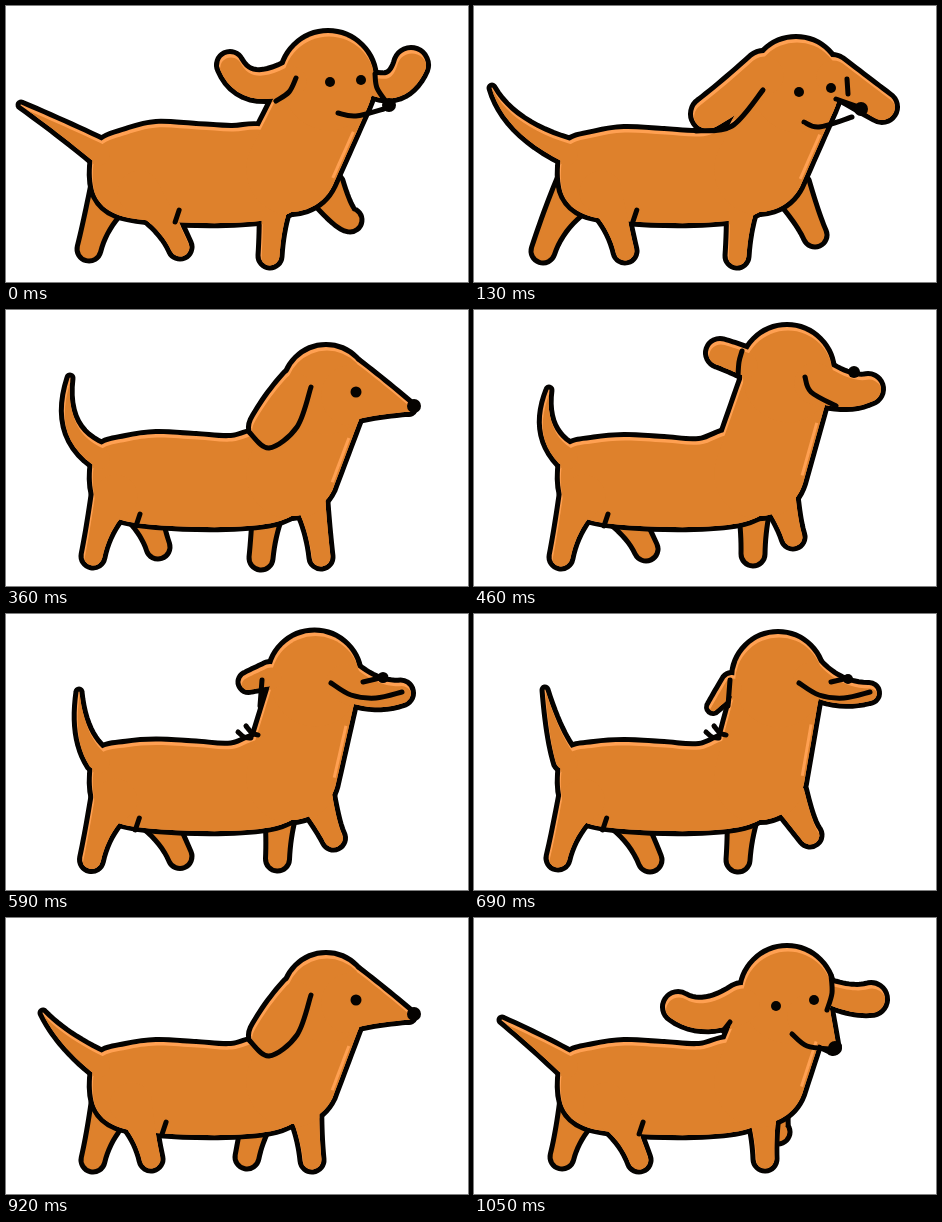
Write an HTML page that moves like this. It is 462 by 276 pixels and loops after 1.15 s.

```html
<!DOCTYPE html>
<html lang="en">
<head>
<meta charset="utf-8">
<title>Walking dachshund</title>
<style>
  html, body { margin: 0; width: 100%; height: 100%; overflow: hidden; background: #fff; }
  svg { display: block; width: 100%; height: 100%; }
  .fur { fill: #de812c; }
  .light { fill: #ffa052; }
  .dot { fill: #050301; }
  .ink, .line { stroke: #050301; stroke-linejoin: round; stroke-linecap: round; }
  .ink { stroke-width: 10; }
  .line { fill: none; stroke-width: 5; }
  .glow { fill: none; stroke: #ffa052; stroke-width: 3; }
</style>
</head>
<body>
<svg id="stage" viewBox="0 0 462 276"></svg>
<script>
// dome: x, y, radius. limbs (ears, snout): start, bend, end, two radii.
const profile = {
  dome: [320, 79, 42],
  limbs: [[290, 75, 274, 96, 264, 118, 16, 20], [345, 82, 372, 88, 403, 98, 32, 5]],
  dots: [[350, 82, 5.5], [408, 96, 7]],
  lines: [[243, 122, 263, 138, 291, 117, 305, 77]]
};

const lookBack = {
  dome: [313, 63, 46],
  limbs: [[270, 52, 258, 47, 246, 43, 14, 13], [340, 70, 372, 86, 394, 79, 22, 14]],
  dots: [[380, 62, 6]],
  lines: [[331, 67, 337, 82, 362, 96], [268, 41, 265, 52, 264, 66]]
};

const lookAway = {
  dome: [304, 65, 45],
  limbs: [[258, 70, 248, 82, 239, 93, 10, 5], [335, 62, 362, 83, 395, 79, 18, 9]],
  dots: [[374, 65, 5]],
  lines: [[325, 69, 345, 81, 370, 84, 396, 78], [357, 68, 374, 64], [256, 66, 254, 92],
    [232, 118, 238, 123, 245, 124], [240, 112, 246, 119, 252, 121]]
};

const earsUp = {
  dome: [322, 74, 47],
  limbs: [[285, 72, 240, 92, 224, 59, 16, 12], [372, 80, 395, 85, 405, 59, 12, 16]],
  dots: [[324, 76, 5], [355, 74, 5], [383, 99, 7]],
  lines: [[270, 95, 283, 86, 290, 72], [332, 107, 350, 110, 381, 102], [369, 68, 371, 82, 381, 97]]
};

const earsDown = {
  dome: [322, 78, 45],
  limbs: [[290, 66, 258, 92, 234, 108, 20, 16], [358, 68, 385, 86, 408, 101, 18, 14]],
  dots: [[325, 86, 5], [357, 82, 5], [387, 103, 7]],
  lines: [[222, 125, 258, 120, 289, 84], [330, 116, 345, 121, 378, 111], [373, 73, 374, 88], [362, 93, 382, 100]]
};

const earsOut = {
  dome: [313, 76, 46],
  limbs: [[268, 84, 230, 106, 204, 89, 18, 14], [358, 76, 380, 84, 397, 81, 12, 15], [335, 95, 348, 115, 359, 129, 24, 5]],
  dots: [[302, 88, 5], [340, 82, 5], [361, 130, 7]],
  lines: [[249, 113, 256, 104], [318, 116, 333, 128, 357, 131], [357, 57, 358, 75, 353, 92]]
};

// rear, front: near paw then far paw. tail: tip and sideways bend. sag: drop of the back.
const keys = [
  { head: earsUp,   rear: [174, 241, 83, 243], front: [264, 250, 344, 214], tail: [15, 99, 56],  sag: -6 },
  { head: earsDown, rear: [151, 245, 69, 245], front: [263, 250, 341, 229], tail: [18, 82, 35],  sag: -1 },
  { head: profile,  rear: [87, 246, 152, 237], front: [315, 247, 255, 248], tail: [64, 68, 52],  sag: 0 },
  { head: lookBack, rear: [87, 247, 172, 239], front: [319, 227, 279, 244], tail: [75, 80, 64],  sag: 3 },
  { head: lookAway, rear: [84, 244, 176, 246], front: [336, 221, 264, 246], tail: [71, 76, 80],  sag: 4 },
  { head: profile,  rear: [145, 241, 87, 242], front: [306, 242, 241, 239], tail: [37, 95, 56],  sag: 0 },
  { head: earsOut,  rear: [165, 242, 88, 239], front: [291, 241, 304, 214], tail: [28, 102, 60], sag: 0 }
];

// Halfway between two poses; parts that do not correspond come from the second.
function halfway(a, b) {
  if (typeof b === 'number') return (a + b) / 2;
  if (Array.isArray(b)) return a.length === b.length ? b.map((v, i) => halfway(a[i], v)) : b;
  return Object.fromEntries(Object.keys(b).map(key => [key, halfway(a[key], b[key])]));
}

const between = i => halfway(keys[i], keys[i + 1]);
const poses = [keys[0], keys[1], between(1), keys[2], keys[3], between(3), keys[4], between(4), keys[5], keys[6]];

const mix = (a, b, t) => a + (b - a) * t;
const pairs = flat => flat.flatMap((x, i) => i % 2 ? [] : [[x, flat[i + 1]]]);

// Catmull-Rom spline through a flat list of points
function curve(flat, closed) {
  const points = pairs(flat), n = points.length;
  const at = i => points[closed ? (i + n) % n : Math.max(0, Math.min(n - 1, i))];
  let d = 'M' + points[0];
  for (let i = 0; i < (closed ? n : n - 1); i++) {
    const [p, a, b, q] = [at(i - 1), at(i), at(i + 1), at(i + 2)];
    d += `C${a.map((v, k) => v + (b[k] - p[k]) / 6)} ${b.map((v, k) => v - (q[k] - a[k]) / 6)} ${b}`;
  }
  return d;
}

// One side of a tapered limb; side is -1 for left, 1 for right.
function edge([x0, y0, bx, by, x1, y1, r0, r1], side, flare = 1, inset = 1) {
  return Array.from({ length: 13 }, (_, i) => {
    const t = i / 12, r = mix(r1, r0, (1 - t) ** flare) - inset;
    const dx = mix(bx - x0, x1 - bx, t), dy = mix(by - y0, y1 - by, t), len = Math.hypot(dx, dy);
    return [
      mix(mix(x0, bx, t), mix(bx, x1, t), t) - side * r * dy / len,
      mix(mix(y0, by, t), mix(by, y1, t), t) + side * r * dx / len
    ];
  });
}

function limb(spec, flare) {
  const left = edge(spec, -1, flare), right = edge(spec, 1, flare).reverse();
  const cap = (r, point) => `A${r - 1} ${r - 1} 0 0 1 ${point}`;
  return 'M' + left.join('L') + cap(spec[7], right[0]) + 'L' + right.join('L') + cap(spec[6], left[0]) + 'Z';
}

// A leg swings from a hip that follows its paw a little.
function leg(x, y, hip, follow, thigh) {
  const top = hip + (x - hip) * follow;
  return limb([top, 183, mix(top, x, 0.7), 213, x, y, thigh, 10.5], 2);
}
const rearLeg = (x, y) => leg(x, y, 117, 0.27, 23);
const frontLeg = (x, y) => leg(x, y, 283, 0.6, 18);

const torso = sag => curve([
  94, 136, 120, 128 + sag / 2, 150, 124 + sag, 190, 126 + sag, 225, 128 + sag, 262, 122,
  320, 150, 325, 178, 300, 197, 270, 212, 220, 217, 150, 215, 110, 208, 90, 190, 86, 160
], true);

const circle = (x, y, r) => limb([x, y - 1, x, y, x, y + 1, r, r]);

function add(parent, tag, attrs) {
  const node = document.createElementNS('http://www.w3.org/2000/svg', tag);
  for (const key in attrs) node.setAttribute(key, attrs[key]);
  return parent.appendChild(node);
}

const stage = document.getElementById('stage');

function build({ head, rear, front, tail, sag }, index) {
  const group = add(stage, 'g', { visibility: 'hidden' });
  const draw = (name, shapes, parent = group) => shapes.forEach(d => add(parent, 'path', { class: name, d }));
  const [x, y, r] = head.dome;
  const neck = [285, 160, mix(285, x, 0.5), mix(160, y + 8, 0.5), x, y + 8, 47, r - 2];
  const [tipX, tipY, bend] = tail;

  const far = [rearLeg(rear[2], rear[3]), frontLeg(front[2], front[3])];
  draw('ink', far);
  draw('fur', far);

  const near = [
    torso(sag), rearLeg(rear[0], rear[1]), frontLeg(front[0], front[1]),
    limb([92, 145, bend, 122, tipX, tipY, 12, 1.5]),
    limb(neck), circle(x, y, r), ...head.limbs.map(spec => limb(spec))
  ];
  draw('ink', near);
  draw('light', near);

  // Fur slipped downwards leaves a lit rim along the upper edges.
  const clip = add(group, 'clipPath', { id: 'skin' + index });
  draw('', near, clip);
  const skin = add(group, 'g', { 'clip-path': `url(#skin${index})` });
  draw('fur', near, add(skin, 'g', { transform: 'translate(1 3.5)' }));
  draw('glow', ['M' + edge(neck, 1, 1, 4).slice(1, 9).join('L')], skin);

  const hook = 130 + 0.45 * (rear[0] - 87);
  draw('line', [...head.lines, [hook, 216, hook + 4, 204]].map(line => curve(line)));
  for (const [cx, cy, size] of head.dots) add(group, 'circle', { class: 'dot', cx, cy, r: size });
  return group;
}

const groups = poses.map(build);

// Drawings alternate between 130 ms and 100 ms.
function render(time) {
  const t = time % 1150;
  const current = 2 * Math.floor(t / 230) + (t % 230 >= 130 ? 1 : 0);
  groups.forEach((group, i) => group.setAttribute('visibility', i === current ? 'visible' : 'hidden'));
}

function tick() {
  render(performance.now());
  requestAnimationFrame(tick);
}
tick();
</script>
</body>
</html>
```
